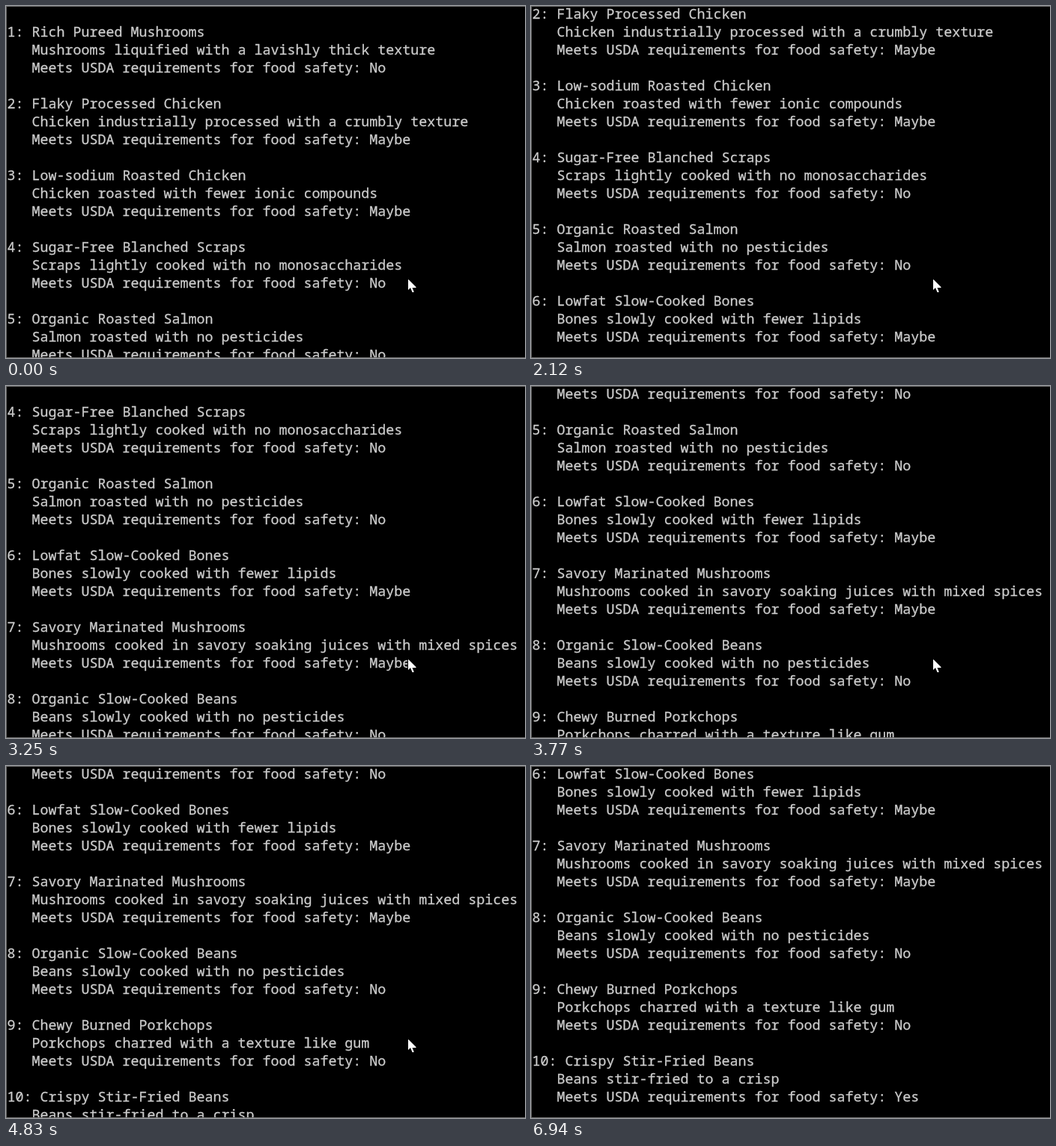
Recreate the animation shown at these times as an HTML page with a canvas. Size 693 by 471 pixels, loop 7410 ms.

```html
<!DOCTYPE html>
<html lang="en">
<head>
<meta charset="utf-8">
<title>Food list in a terminal</title>
<style>
html, body { margin: 0; width: 100%; height: 100%; overflow: hidden; background: #000; }
canvas { display: block; }
</style>
</head>
<body>
<canvas id="stage" width="693" height="471"></canvas>
<script>
const W = 693, H = 471, LOOP = 7410, ROW = 24;
const ctx = document.getElementById('stage').getContext('2d');

const foods = [
  ['Rich Pureed Mushrooms', 'Mushrooms liquified with a lavishly thick texture', 'No'],
  ['Flaky Processed Chicken', 'Chicken industrially processed with a crumbly texture', 'Maybe'],
  ['Low-sodium Roasted Chicken', 'Chicken roasted with fewer ionic compounds', 'Maybe'],
  ['Sugar-Free Blanched Scraps', 'Scraps lightly cooked with no monosaccharides', 'No'],
  ['Organic Roasted Salmon', 'Salmon roasted with no pesticides', 'No'],
  ['Lowfat Slow-Cooked Bones', 'Bones slowly cooked with fewer lipids', 'Maybe'],
  ['Savory Marinated Mushrooms', 'Mushrooms cooked in savory soaking juices with mixed spices', 'Maybe'],
  ['Organic Slow-Cooked Beans', 'Beans slowly cooked with no pesticides', 'No'],
  ['Chewy Burned Porkchops', 'Porkchops charred with a texture like gum', 'No'],
  ['Crispy Stir-Fried Beans', 'Beans stir-fried to a crisp', 'Yes']
];
const lines = foods.flatMap(([name, about, safe], i) => [
  '',
  `${i + 1}: ${name}`,
  `   ${about}`,
  `   Meets USDA requirements for food safety: ${safe}`
]);

// Each time moves the list up by one row.
const scrolls = [1590, 1680, 1770, 1940, 2120, 2300, 2410, 2520, 2800, 3070, 3160,
  3250, 3410, 3590, 3770, 3950, 4120, 4350, 4830, 5180, 5650];

const exit = { start: 6580, step: 90, moves: 4 };
const arrow = new Path2D('M0 0V14L3 11L5.5 17H7.5V16L5.5 11H10.5V10L.5 0Z');

function drawText(t) {
  const top = scrolls.filter(s => s <= t).length;
  ctx.fillStyle = ctx.strokeStyle = '#ccc';
  ctx.lineWidth = 0.3;
  ctx.font = '18.3333px "Noto Sans Mono", "DejaVu Sans Mono", monospace';
  lines.slice(top, top + 20).forEach((line, row) => {
    const y = 17 + ROW * row;
    ctx.fillText(line, 1.5, y);
    ctx.strokeText(line, 1.5, y);
  });
}

function drawBorder() {
  ctx.fillStyle = '#686868';
  ctx.fillRect(0, 0, W, 1);
  ctx.fillRect(0, 0, 1, H);
  ctx.fillRect(0, H - 1, W, 1);
}

function drawPointer(t) {
  const move = t < exit.start ? 0 : Math.floor((t - exit.start) / exit.step) + 1;
  if (move > exit.moves) return;
  const k = Math.pow(move / exit.moves, 1.4);
  ctx.save();
  ctx.translate(Math.round(537 + 107 * k), Math.round(366 + 96 * k));
  ctx.strokeStyle = '#000';
  ctx.lineWidth = 2;
  ctx.stroke(arrow);
  ctx.fillStyle = '#fff';
  ctx.fill(arrow);
  ctx.restore();
}

function draw(t) {
  ctx.fillStyle = '#000';
  ctx.fillRect(0, 0, W, H);
  drawText(t);
  drawBorder();
  drawPointer(t);
}

let begin;
function tick(now) {
  begin ??= now;
  draw((now - begin) % LOOP);
  requestAnimationFrame(tick);
}
draw(0);
requestAnimationFrame(tick);
</script>
</body>
</html>
```
